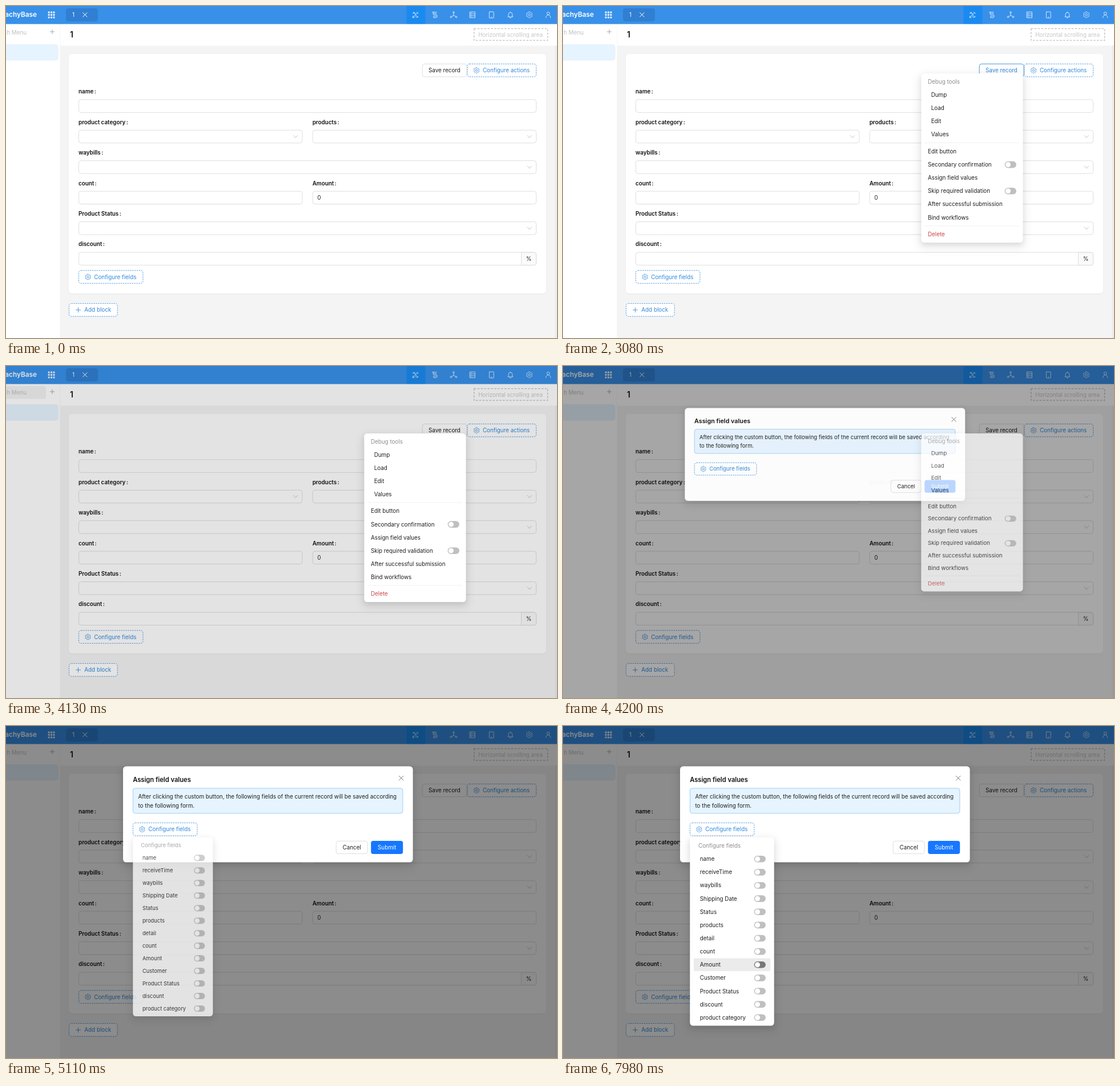
An HTML page for the animation above (8000 ms loop, 965 by 581 pixels).

```html
<!DOCTYPE html>
<html lang="en">
<head>
<meta charset="utf-8">
<title>Form builder</title>
<style>
  html, body { margin: 0; width: 100%; height: 100%; overflow: hidden; background: #fff; }
  svg { display: block; width: 100vw; height: 100vh; }
  text { font: 9.83px Inter, sans-serif; fill: #1f1f1f; white-space: pre; }
  .b { font-weight: 600; fill: #111; }
  .blue { fill: #2f88dc; }
  .mute { fill: #8c8c8c; }
  .pale { fill: #bfbfbf; }
  .line { fill: none; stroke-linecap: round; stroke-linejoin: round; }
</style>
</head>
<body>
<svg id="stage" viewBox="0 0 965 581" preserveAspectRatio="none"></svg>
<script>
const BLUE = '#3a8fe0', GREY = '#d9d9d9';
const stage = document.getElementById('stage');

// Drawing helpers; text is placed by the middle of its capitals.
const rect = (x, y, w, h, fill, r = 0, more = '') =>
  `<rect x="${x}" y="${y}" width="${w}" height="${h}" rx="${r}" fill="${fill}" ${more}/>`;
const text = (x, y, s, cls = '', more = '') =>
  `<text x="${x}" y="${y + 3.5}" class="${cls}" ${more}>${s}</text>`;
const line = (d, color, width = 0.9) =>
  `<path class="line" d="${d}" stroke="${color}" stroke-width="${width}"/>`;
const ring = (x, y, r, color, width = 0.9) =>
  `<circle cx="${x}" cy="${y}" r="${r}" fill="none" stroke="${color}" stroke-width="${width}"/>`;
const box = (x, y, w, h, stroke = GREY, fill = '#fff', more = '') =>
  rect(x + 0.4, y + 0.4, w - 0.8, h - 0.8, fill, 4, `stroke="${stroke}" stroke-width=".85" ${more}`);
const cross = (x, y, r, color, width) =>
  line(`M${x - r} ${y - r}l${2 * r} ${2 * r}m0 ${-2 * r}l${-2 * r} ${2 * r}`, color, width);
const plus = (x, y, r, color) =>
  line(`M${x - r} ${y}h${2 * r}M${x} ${y - r}v${2 * r}`, color);
const group = (id, body) => `<g id="${id}">${body}</g>`;

function gear(x, y, color, r = 4.9) {
  const points = [];
  for (let i = 0; i < 24; i++) {
    const a = (i - 0.5) * Math.PI / 12, k = i % 4 < 2 ? r : r * 0.82;
    points.push((x + k * Math.sin(a)).toFixed(2) + ' ' + (y - k * Math.cos(a)).toFixed(2));
  }
  return line('M' + points.join('L') + 'Z', color, 0.85) + ring(x, y, r * 0.36, color, 0.85);
}

const dashed = (x, y, w, label, icon) =>
  box(x, y, w, 23.3, BLUE, '#fff', 'stroke-dasharray="2.4 1.5"') +
  icon(x + 16.5, y + 11.7, BLUE) + text(x + 27.3, y + 11.7, label, 'blue');
const plusIcon = (x, y, color) => plus(x, y, 4, color);

const toggle = (x, y, id = '') =>
  rect(x, y - 5.8, 20.3, 11.6, '#bfbfbf', 5.8, id && `id="${id}"`) +
  `<circle cx="${x + 5.9}" cy="${y}" r="4.5" fill="#fff"/>`;

const panel = (x, y, w, h) =>
  rect(x - 5, y + 1, w + 10, h + 10, '#000', 9, 'opacity=".06" style="filter:blur(8px)"') +
  rect(x, y + 4, w, h, '#000', 5, 'opacity=".09" style="filter:blur(5px)"') +
  rect(x, y, w, h, '#fff', 5.5);

const label = (x, y, s) => text(x, y, s + '<tspan dx="1.4">:</tspan>', 'b');
function field(x, row, w, name, select) {
  const y = 149.7 + 53.45 * row;
  return label(x, y, name) + box(x, y + 13.7, w, 23.3) +
    (select ? line(`M${x + w - 15.8} ${y + 23.4}l3.6 4.2l3.6 -4.2`, '#bfbfbf') : '');
}

function header() {
  const w = '#e3f0fd', squares = [];
  for (let i = 0; i < 9; i++)
    squares.push(rect(73.6 + 4.4 * (i % 3), 9.6 + 4.4 * Math.floor(i / 3), 3.1, 3.1, w, 0.5));
  return rect(0, 0, 965, 31.6, '#3890e9') +
    text(54, 15.7, 'TachyBase', '', 'text-anchor="end" style="font-size:11.8px;font-weight:600;fill:#fff"') +
    squares.join('') +
    rect(105, 4, 56, 23, '#307fd2', 4.5) +
    text(116, 15.3, '1', '', 'style="fill:#fff"') + cross(138.3, 15.3, 3.7, '#fff', 1) +
    rect(701.5, 0, 33, 31.2, '#1a8af0') +
    line('M713 11l8.6 8.6M721.6 11l-8.6 8.6M712.4 13.4l2.4 -2.6l2.6 2.6M716.8 17.8l2.6 2.6l2.4 -2.4M719.2 10.8l2.8 2.8M712.6 17.4l-.3 3l3 -.3', w) +
    line('M748.3 10.8h5.6M746.4 10.8h1.9v4.4h5.2q1.6 0 1.6 2.6t-1.6 2.6h-4.6v-2.6h4.8M749.6 13h4.2', w) +
    line('M784 12.2v4.2l-3.8 2.2M784 16.4l3.8 2.2', w) +
    ring(784, 11.2, 1.3, w) + ring(779.4, 19.2, 1.3, w) + ring(788.6, 19.2, 1.3, w) +
    line('M812.6 10.4h8.8v10.2h-8.8zM812.6 13.8h8.8M812.6 17.2h8.8M814.4 12.1h.6M814.4 15.5h.6M814.4 18.9h.6', w) +
    line('M847 10.2h6.6q.6 0 .6 .6v9.6q0 .6 -.6 .6h-6.6q-.6 0 -.6 -.6v-9.6q0 -.6 .6 -.6zM849.9 19.2h.8', w) +
    line('M879 18.8h8.8M880 18.8v-4q0 -3.4 3.4 -3.6q3.4 .2 3.4 3.6v4M883.4 11.2v-1M882 20.6h2.8', w) +
    gear(916.6, 15.4, w, 5.3) +
    ring(949.7, 12.9, 2.4, w) + line('M945.5 20.4q.4 -4.4 4.2 -4.6q3.8 .2 4.2 4.6', w);
}

function page() {
  return rect(0, 0, 965, 581, '#f4f4f4') +
    rect(95, 31, 870, 38.3, '#fff') + rect(0, 31, 95, 550, '#fff') +
    rect(94.6, 31, 0.7, 550, '#f0f0f0') + rect(961.4, 69.3, 3.6, 512, '#ececec') +
    header() +
    rect(-8, 35, 78, 22.4, '#f1f1f1', 4, 'id="search" opacity="0"') +
    text(36, 46.4, 'Search Menu', 'pale', 'text-anchor="end"') +
    plus(81, 45, 3.7, '#a0a0a0') + rect(-8, 67, 99.8, 28.5, '#e6f4ff', 5) +
    text(112, 51.8, '1', 'b', 'style="font-size:13.8px"') +
    rect(819.8, 39.7, 128.8, 20.4, 'none', 0, 'stroke="#bfbfbf" stroke-width="1.3" stroke-dasharray="3.6 2.3"') +
    text(827.3, 50, 'Horizontal scrolling area', '', 'style="fill:#c6c6c6"') +
    rect(110, 85, 836, 419, '#000', 6, 'opacity=".05" style="filter:blur(1px)"') +
    rect(110, 84, 836, 419, '#fff', 6) +
    box(728.8, 101, 78.6, 23.3) + text(740, 112.7, 'Save record') +
    group('hover', box(728.8, 101, 78.6, 23.3, BLUE) + text(740, 112.7, 'Save record', 'blue')) +
    dashed(807.6, 101, 121.4, 'Configure actions', gear) +
    field(127, 0, 802, 'name') +
    field(127, 1, 392.3, 'product category', true) + field(536.7, 1, 392.3, 'products', true) +
    field(127, 2, 802, 'waybills', true) +
    field(127, 3, 392.3, 'count') + field(536.7, 3, 392.3, 'Amount') + text(545.3, 335.4, '0') +
    field(127, 4, 802, 'Product Status', true) +
    field(127, 5, 802, 'discount') +
    `<path d="M902.5 431.2H925q3.6 0 3.6 3.6v15.2q0 3.6 -3.6 3.6H902.5z" fill="#fafafa" stroke="${GREY}" stroke-width=".85"/>` +
    text(910.8, 442.3, '%') +
    dashed(127, 462.4, 113.3, 'Configure fields', gear) +
    dashed(110, 520.2, 85.6, 'Add block', plusIcon);
}

function actionMenu() {
  const lower = ['Edit button', 'Secondary confirmation', 'Assign field values',
    'Skip required validation', 'After successful submission', 'Bind workflows'];
  return panel(627.3, 118, 178.2, 296) + text(639, 132.3, 'Debug tools', 'mute') +
    ['Dump', 'Load', 'Edit', 'Values'].map((s, i) => text(644.7, 155.4 + 23.12 * i, s)).join('') +
    rect(633, 238.9, 166, 0.8, '#ededed') + rect(633, 384.4, 166, 0.8, '#ededed') +
    lower.map((s, i) => text(639, 254.4 + 23.12 * i, s)).join('') +
    toggle(773.6, 277.6) + toggle(773.6, 323.8) +
    text(639, 399.6, 'Delete', '', 'style="fill:#cc4347"');
}

function dialog() {
  const mid = 'text-anchor="middle"';
  return panel(205, 70.6, 507.6, 167.9) +
    text(222.2, 94.5, 'Assign field values', 'b', 'style="font-size:11.15px"') +
    cross(692.2, 91.2, 3.8, '#777', 1) +
    box(222, 108.6, 473.3, 44.6, '#91c6f5', '#e6f4ff') +
    text(231.5, 123.2, 'After clicking the custom button, the following fields of the current record will be saved according') +
    text(231.5, 139, 'to the following form.') +
    dashed(222, 169.1, 113.3, 'Configure fields', gear) +
    box(577.8, 200.9, 55.8, 23) + text(605.7, 212.5, 'Cancel', '', mid) +
    rect(639.2, 200.9, 56, 23, '#1677ff', 4) +
    text(667.2, 212.5, 'Submit', '', mid + ' style="fill:#fff"');
}

const ITEMS = ['name', 'receiveTime', 'waybills', 'Shipping Date', 'Status', 'products', 'detail',
  'count', 'Amount', 'Customer', 'Product Status', 'discount', 'product category'];
const fieldMenu = () => panel(222.3, 195, 147.4, 329.6) + text(237, 209.8, 'Configure fields', 'mute') +
  ITEMS.map((s, i) => {
    const y = 232.7 + 23.13 * i;
    return rect(228.8, y - 11.3, 134.6, 22.6, '#ebebeb', 2.5, `id="row${i}" opacity="0"`) +
      text(239.8, y, s) + toggle(334.7, y, 'toggle' + i);
  }).join('');

stage.innerHTML = page() + rect(0, 0, 965, 581, '#000', 0, 'id="mask"') +
  group('dialog', dialog()) + group('actions', actionMenu()) + group('fields', fieldMenu());

// Motion: the picture advances in steps of 70 ms.
const STEP = 70, LOOP = 8000;
const $ = id => document.getElementById(id);
const ramp = (t, start, steps) => Math.max(0, Math.min(1, ((t - start) / STEP + 1) / steps));
const at = (t, start, values) =>
  values[Math.max(0, Math.min(values.length - 1, Math.floor((t - start) / STEP) + 1))];

function pose(id, opacity, ox = 0, oy = 0, sx = 1, sy = 1) {
  const el = $(id);
  el.setAttribute('visibility', opacity > 0 ? 'visible' : 'hidden');
  el.setAttribute('opacity', opacity);
  el.setAttribute('transform', `translate(${ox} ${oy}) scale(${sx} ${sy}) translate(${-ox} ${-oy})`);
}

// Start time, row under the pointer, shade of its switch.
const POINTER = [[5670, 0, 140], [5740, 1, 140], [5810, 2, 140], [5880, 3, 140], [5950, 4, 140],
  [6090, 5, 146], [7560, 7, 146], [7840, 8, 119]];

function pointAt(t) {
  ITEMS.forEach((_, i) => {
    let glow = 0, shade = 191;
    POINTER.forEach(([start, row, dark], n) => {
      if (row !== i) return;
      const end = n + 1 < POINTER.length ? POINTER[n + 1][0] : Infinity;
      glow = ramp(t, start, 2) * (1 - ramp(t, end, 2));
      const s = ramp(t, start, 3) * (1 - ramp(t, end, 2));
      shade = Math.round(191 + (dark - 191) * s);
    });
    $('row' + i).setAttribute('opacity', glow);
    $('toggle' + i).setAttribute('fill', `rgb(${shade},${shade},${shade})`);
  });
}

function draw(now) {
  const t = Math.floor((now % LOOP) / STEP) * STEP;
  pose('hover', ramp(t, 70, 3) - ramp(t, 1260, 3) + ramp(t, 1680, 3) - ramp(t, 4060, 2));
  pose('search', t >= 4060 && t < 4200 ? 1 : 0);
  pose('mask', at(t, 4060, [0, 0.02, 0.11, 0.35, 0.43, 0.45]));
  const zoom = at(t, 4200, [0.2, 0.967, 0.996, 1]);
  pose('dialog', at(t, 4200, [0, 0.97, 1]), 458.8, 160, zoom, zoom);
  pose('actions', t < 3080 ? 0 : at(t, 4130, [1, 1, 0.7, 0.15, 0]), 627, 118, 1,
    at(t, 4130, [1, 0.997, 0.934, 0.83]));
  const grow = at(t, 5110, [0.8, 0.95, 0.985, 0.997, 1]);
  pose('fields', at(t, 5110, [0, 0.76, 0.93, 0.99, 1]), 222.3, 195, grow, grow);
  pointAt(t);
}

const begin = performance.now();
function tick() {
  draw(performance.now() - begin);
  requestAnimationFrame(tick);
}
tick();
</script>
</body>
</html>
```
